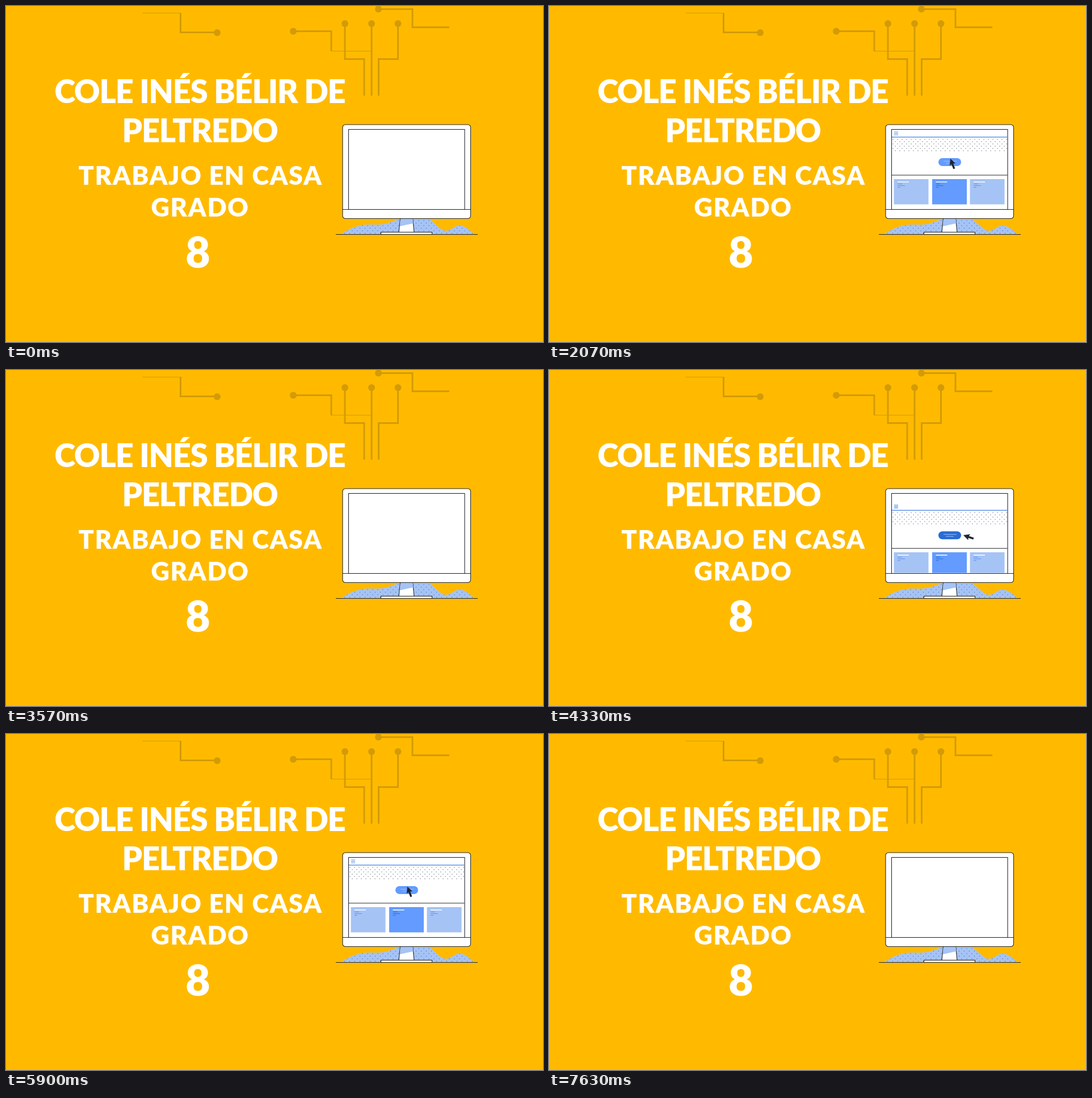
An HTML page for the animation above (7660 ms loop, 946 by 592 pixels).

```html
<!DOCTYPE html>
<html lang="es">
<head>
<meta charset="utf-8">
<title>Trabajo en casa</title>
<style>
  html, body { margin: 0; width: 100%; height: 100%; overflow: hidden; background: #ffba00; }
  svg { display: block; width: 100vw; height: 100vh; }
  text { font-family: Lato, "Open Sans", sans-serif; font-weight: 900; fill: #fff; text-anchor: middle; }
  .title { font-size: 56px; letter-spacing: -1.2px; }
  .sub { font-size: 45px; letter-spacing: 1.6px; }
  .grade { font-size: 75px; }
  .ink { stroke: #26282e; stroke-width: 1.1; }
</style>
</head>
<body>
<svg viewBox="0 0 946 592">
  <defs>
    <clipPath id="screen"><rect x="604" y="218" width="203.5" height="139.5"/></clipPath>
    <pattern id="dots" width="8" height="8" x="604" y="233" patternUnits="userSpaceOnUse">
      <circle cx="2" cy="2" r=".65" fill="#555b66"/>
      <circle cx="6" cy="6" r=".65" fill="#555b66"/>
    </pattern>
    <pattern id="hillDots" width="9" height="9" x="590" y="376" patternUnits="userSpaceOnUse">
      <circle cx="2" cy="2" r=".7" fill="#4a6aa5"/>
      <circle cx="6.5" cy="6.5" r=".7" fill="#4a6aa5"/>
    </pattern>
    <path id="hills" d="M590 402C605 392 622 384 645 385S674 382 693 375.500H745C757 383 765 396 775 396S790 386 800 387S817 395 825 402Z"/>
  </defs>

  <rect width="946" height="592" fill="#ffba00"/>

  <g fill="none" stroke="#d39b07" stroke-width="3">
    <path d="M307.500 12V46.500H368M510 44.500H573V79M597 34V93.500H631V158M644 34V158M690.500 34V93.500H656.500V158M660 5.500H716V37.500H781"/>
    <path stroke-width="1.2" d="M240 12.500H308M572 79.500H644"/>
  </g>
  <g id="nodes" fill="#d39b07"></g>

  <text class="title" x="341.500" y="171">COLE INÉS BÉLIR DE</text>
  <text class="title" x="341.500" y="240">PELTREDO</text>
  <text class="sub" x="342.500" y="315">TRABAJO EN CASA</text>
  <text class="sub" x="342" y="371">GRADO</text>
  <text class="grade" x="338" y="461">8</text>

  <use href="#hills" fill="#a5c3f5"/>
  <use href="#hills" fill="url(#hillDots)"/>
  <g class="ink" fill="#fff">
    <path d="M581 402.500H831"/>
    <path d="M694.500 374H716.500L719 399H692Z"/>
    <path d="M695 375H716.500L717.300 383L694 388Z" fill="#a5c3f5" stroke="none"/>
    <rect x="660.500" y="398.500" width="90" height="4"/>
    <rect x="593" y="209" width="225.500" height="165.500" rx="5"/>
    <path d="M593 358.500H818.500"/>
    <rect x="603.500" y="217.500" width="204.500" height="141"/>
  </g>

  <g clip-path="url(#screen)">
    <g id="page">
      <path d="M608 222H615M608 224.500H615M608 227H615" stroke="#5f93ee" stroke-width="1.200"/>
      <path d="M604 231H808" stroke="#5f93ee" stroke-width="1.500"/>
      <rect x="604" y="233" width="204" height="25" fill="url(#dots)"/>
      <rect id="button" x="686" y="268" width="40" height="14" rx="7"/>
      <path d="M695 273.500H718M699 277H713" stroke="#9fc1fa" stroke-width="1"/>
      <path class="ink" d="M604 298H808"/>
      <g id="cards"></g>
    </g>
    <path id="cursor" fill="#20262f" d="M0 0L11 -5.500L9.800 -1.700H19V1.700H9.800L11 5.500Z"/>
  </g>
</svg>
<script>
const LOOP = 7660, CYCLE = LOOP / 2;
const IN_START = 124, IN_TIME = 727, MIRROR = 3384;
const $ = id => document.getElementById(id);
const clamp = v => Math.min(1, Math.max(0, v));
const mix = (a, b, k) => a + (b - a) * k;

$("nodes").innerHTML = [[372, 47], [506, 44.5], [597, 31], [644, 31], [690.5, 31], [656, 5.5]]
  .map(([x, y]) => `<circle cx="${x}" cy="${y}" r="6"/>`).join("");

const card = (x, fill, line) => `<rect x="${x}" y="305" width="61" height="44.500" fill="${fill}"/>
  <path d="M${x + 6.5} 310h20" stroke="#fff" stroke-width="1.400"/>
  <path d="M${x + 6.5} 313.500h8m-8 3h13m-13 3h5" stroke="${line}" stroke-width="1"/>`;
$("cards").innerHTML = card(607.5, "#a5c3f5", "#5f93ee")
  + card(675, "#639bff", "#2f6ed4") + card(741.5, "#a5c3f5", "#5f93ee");

// time, tip x, tip y, angle
const path = [
  [120, 814, 304, 5], [300, 766, 299, 10], [500, 730, 291, 19],
  [630, 717, 284, 34], [800, 709, 275, 54], [1000, 707, 269, 69]
];

function pose(t) {
  let i = 1;
  while (i < path.length - 1 && t > path[i][0]) i++;
  const a = path[i - 1], b = path[i], k = clamp((t - a[0]) / (b[0] - a[0]));
  return [1, 2, 3].map(n => mix(a[n], b[n], k));
}

function draw(time) {
  const phase = time % CYCLE;
  const t = Math.min(phase, MIRROR - phase); // leaving retraces the arrival
  const left = 1 - clamp((t - IN_START) / IN_TIME);
  $("page").setAttribute("transform", `translate(0 ${145 * left ** 3})`);

  const [x, y, angle] = pose(t);
  $("cursor").setAttribute("transform", `translate(${x} ${y}) rotate(${angle})`);
  $("cursor").setAttribute("visibility", t > IN_START ? "visible" : "hidden");

  const hover = clamp((t - 800) / 150);
  const rgb = [[42, 99], [107, 155], [212, 255]].map(([a, b]) => Math.round(mix(a, b, hover)));
  $("button").setAttribute("fill", `rgb(${rgb})`);
}

const start = performance.now();
function tick() {
  draw((performance.now() - start) % LOOP);
  requestAnimationFrame(tick);
}
tick();
</script>
</body>
</html>
```
